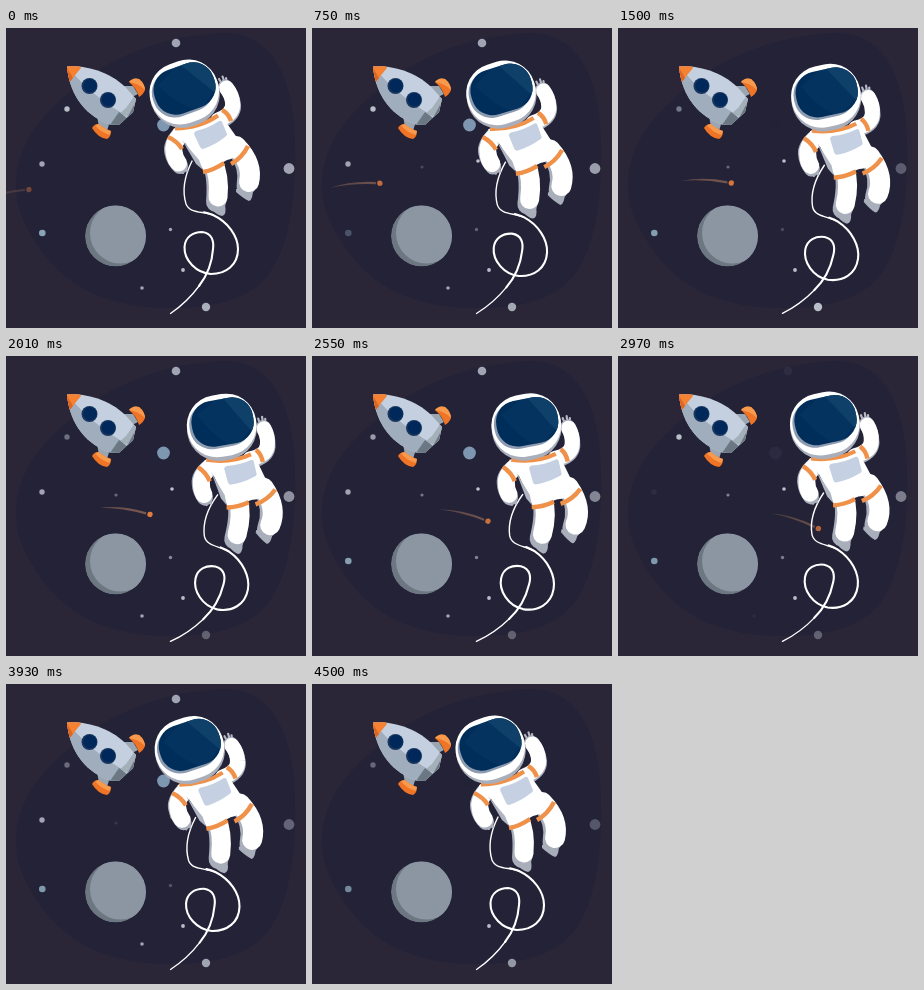
These frames come from a looping animation (300 by 300 pixels, 4530 ms). An HTML page:

```html
<!DOCTYPE html>
<html lang="en">
<head>
<meta charset="utf-8">
<title>Astronaut in space</title>
<style>
html, body { margin: 0; width: 100%; height: 100%; overflow: hidden; background: #2a2638; }
svg { display: block; width: 100vw; height: 100vh; }
.limb, .rope { fill: none; stroke-linecap: round; stroke-linejoin: round; }
.rope { stroke: #fff; }
.band { fill: none; stroke: #f0914a; stroke-width: 4.4; }
.finger { fill: none; stroke: #b4b9c4; stroke-width: 2.2; stroke-linecap: round; }
</style>
</head>
<body>
<svg viewBox="0 0 300 300">
  <defs>
    <linearGradient id="trail">
      <stop offset="0" stop-color="#946a58" stop-opacity=".5"/>
      <stop offset="1" stop-color="#946a58" stop-opacity=".8"/>
    </linearGradient>
    <clipPath id="planet"><circle cx="109.5" cy="208" r="30.5"/></clipPath>
    <clipPath id="hull"><path d="M61 38.500C80 37 106 44 122 62L130 71L127 84L113 97L104 96.500C82 89 64 70 61 38.500Z"/></clipPath>
    <clipPath id="visor"><rect x="-31" y="-23" width="62" height="46" rx="21" transform="translate(178.500 60.500) rotate(-20)"/></clipPath>
  </defs>

  <rect width="300" height="300" fill="#2a2638"/>
  <path fill="#232237" d="M10 155C12 112 38 86 66 62C104 28 160 7 218 5C263 4 284 45 288 96C292 155 286 222 258 252C232 280 182 282 140 279C88 273 58 254 35 222C18 198 9 178 10 155Z"/>

  <g id="stars"></g>

  <g id="comet">
    <path fill="url(#trail)" d="M41.500 155.500Q64 149.500 88 152.800L88 155Q64 152 41.500 155.500Z"/>
    <circle cx="92" cy="154.300" r="2.7" fill="#e27c3e"/>
  </g>

  <g clip-path="url(#planet)">
    <circle cx="109.5" cy="208" r="30.5" fill="#6d7782"/>
    <circle cx="114.500" cy="205" r="30.5" fill="#8b96a2"/>
  </g>

  <g id="rocket">
    <path fill="#9aa6b2" d="M116 58L127 58L132 66L124 70ZM91 88L104 93L101 103L93 99Z"/>
    <path fill="#ef7426" d="M123 54Q127 49 133 51Q139 56 139 62Q137 67 133 69Q131 61 123 54Z"/>
    <path fill="#f79a4d" d="M123 54Q127 49 133 51Q139 56 139 62Q132 55 123 54Z"/>
    <path fill="#ef7426" d="M86 100Q88 96 93 96Q98 101 105 103Q105 109 101 111Q92 110 86 100Z"/>
    <path fill="#f79a4d" d="M93 96Q98 101 105 103L103.500 107Q94 104 89 97Z"/>
    <g clip-path="url(#hull)">
      <path fill="#c4d0df" d="M55 30H140V105H55Z"/>
      <path fill="#9fadbc" d="M61 38.500Q86 68 117 86L105 105L55 95Z"/>
      <path fill="#a3b0b9" d="M120 80L129 67L136 72L126 90L113 86Z"/>
      <path fill="#6b7883" d="M128 77L136 72L130 90L112 102L104 97L113 84L121 90Z"/>
      <path fill="#f58233" d="M58 34H72L75 40Q69 47 63 55L58 58Z"/>
      <path fill="#de6420" d="M60 38L67 50L63 55L57 58Z"/>
    </g>
    <g fill="#17355f"><circle cx="83.5" cy="58" r="8"/><circle cx="102" cy="72" r="8"/></g>
    <g fill="#00285a"><circle cx="84" cy="57.700" r="6.600"/><circle cx="102.500" cy="71.700" r="6.600"/></g>
  </g>

  <g id="astronaut">
    <path class="rope" stroke-width="1.4" d="M186 133C181 143 175 160 180 176C184 186 197 183 207 187"/>
    <path class="rope" stroke-width="2.1" d="M198 184.300Q203 185.300 207 187C222 194 232 208 232 221C232 237 220 246 205 246C190 245 178 232 178.500 219C179 209 187 204 196 204C206 205 208 213 207 221C206 236 200 249 193 258"/>
    <path class="rope" stroke-width="1.3" d="M193 258C185 269 174 279 164.500 285.500"/>

    <g class="finger">
      <path d="M217 58L213 51M219 56L216.500 48.500M221 57L220 50M173 139L173 144M176 138L177 145M178 137L181 143"/>
    </g>
    <g class="limb" stroke="#a9aebb">
      <path stroke-width="16" d="M174 106Q164 117 166.500 125Q168 132 174 138"/>
      <path stroke-width="15" d="M212 94Q228 88 227.500 77Q226 66 219.500 59"/>
      <path stroke-width="20" d="M206 136Q212 148 210 174"/>
      <path stroke-width="19" d="M230 120Q244 138 240 158"/>
    </g>
    <g fill="#a9aebb">
      <path d="M202 174L219 177Q221 187 216 188Q210 187 202 178Z"/>
      <path d="M230 161L247 160Q247 172 243 173Q238 171 230 164Z"/>
    </g>
    <g class="limb" stroke="#fff">
      <path stroke-width="17" d="M175 106Q166 116 168 124Q169 131 172.500 135"/>
      <path stroke-width="15" d="M212 92Q228 86 226.500 75Q226 67 220.500 60"/>
      <path stroke-width="19" d="M207 134Q214 148 212 169"/>
      <path stroke-width="20" d="M230 118Q247.500 136 243 154"/>
    </g>
    <path fill="#fff" d="M167 101Q190 99 213 86L222 97Q230 108 238 120Q229 131 221 132Q210 139 198 143Q188 128 177 112Z"/>
    <path fill="#b0b5c2" d="M176 112L183 124L190 136L197 142L193 132Z"/>
    <path class="band" d="M162 109Q171 113 176 121M216 82Q222 85 225 93M197 144Q208 142 218 135M225 136Q236 130 242 118"/>
    <path fill="#c5d1e2" d="M190 103Q203 100 213 93Q215 92 216 94L221 106Q221 108 219 109Q209 117 197 121Q195 121 194 119L188 106Q188 104 190 103Z"/>
    <path fill="none" stroke="#f0914a" stroke-width="4" d="M169 100.500Q194 100 212 87.500"/>

    <g transform="translate(178.300 65) rotate(-20)">
      <rect x="-35" y="-31" width="70" height="65" rx="32" fill="#a9aebb"/>
      <rect x="-34.500" y="-32" width="69.500" height="62" rx="30" fill="#fff"/>
    </g>
    <rect x="-31" y="-23" width="62" height="47" rx="22" transform="translate(176.500 62.500) rotate(-20)" fill="#8d9bb0"/>
    <g clip-path="url(#visor)">
      <path fill="#002e5a" d="M140 30H215V100H140Z"/>
      <path fill="#0d3a66" opacity=".4" d="M152 58L173 34L208 62L195 83Q174 79 152 58Z"/>
      <path fill="#0f4069" d="M171 34H215V68L207 63Z"/>
    </g>
  </g>
</svg>

<script>
const LOOP = 4530;
const TIMES = [0, 750, 1500, 2010, 2970, 3450, 4500];
const $ = id => document.getElementById(id);

// piecewise linear value at time t
function lerpKeys(times, values, t) {
  let i = 1;
  while (i < times.length - 1 && t > times[i]) i++;
  const p = Math.min(1, (t - times[i - 1]) / (times[i] - times[i - 1]));
  return values[i - 1] + (values[i] - values[i - 1]) * p;
}

// fades to zero at `zero` and every `period` after it; full until `hold`
const pulse = (zero, period, hold = 0, gain = 1) => t =>
  t < hold ? 1 : Math.min(1, gain * Math.abs(Math.sin(Math.PI * (t - zero) / period)));
const keyed = (...values) => t => lerpKeys(TIMES, values, t);
const steady = () => 1;
const blink = pulse(0, 1500, 750, 1.3);

const GREY = '#a1a4b2', PALE = '#b8bfc8', BLUE = '#8fabbd';
const stars = [
  [170, 15, 4.3, GREY, blink],
  [36, 136, 2.7, GREY, blink],
  [136, 260, 1.8, GREY, blink],
  [157.5, 97, 6.4, '#7d97b0', blink],
  [36.3, 205, 3.3, BLUE, pulse(580, 1435)],
  [200, 279, 4.2, PALE, keyed(.9, .85, 1, .4, .4, .9, .75)],
  [61, 81, 2.7, PALE, keyed(1, 1, .55, .5, 1, .5, .45)],
  [283, 140.5, 5.4, GREY, keyed(1, .95, .45, .85, .7, .6, .4)],
  [164.5, 201.5, 1.7, GREY, keyed(1, .5, .3, .8, .7, .7, 0)],
  [110, 139, 1.6, GREY, keyed(0, .3, .55, .55, .75, .3, 0)],
  [177, 242, 1.9, PALE, steady],
  [166, 133, 1.8, '#c0c2cc', steady]
].map(([cx, cy, r, fill, level]) => {
  const el = document.createElementNS('http://www.w3.org/2000/svg', 'circle');
  for (const [k, v] of Object.entries({ cx, cy, r, fill })) el.setAttribute(k, v);
  $('stars').append(el);
  return { el, level };
});

const rotate = (id, angle, x, y) =>
  $(id).setAttribute('transform', `rotate(${angle.toFixed(3)} ${x} ${y})`);

function draw(t) {
  // the astronaut swings about the loose end of the tether
  rotate('astronaut', 5 * (1 - Math.cos(2 * Math.PI * (t + 55) / LOOP)), 165, 285);
  rotate('comet', -12.07 + 0.0105 * t, 92, 485);
  $('comet').setAttribute('opacity',
    lerpKeys([0, 600, 2000, 2970, 3450, 3650], [.4, .8, 1, .75, .2, 0], t));
  for (const { el, level } of stars) el.setAttribute('opacity', level(t).toFixed(3));
}

const start = performance.now();
function tick() {
  draw((performance.now() - start) % LOOP);
  requestAnimationFrame(tick);
}
tick();
</script>
</body>
</html>
```
